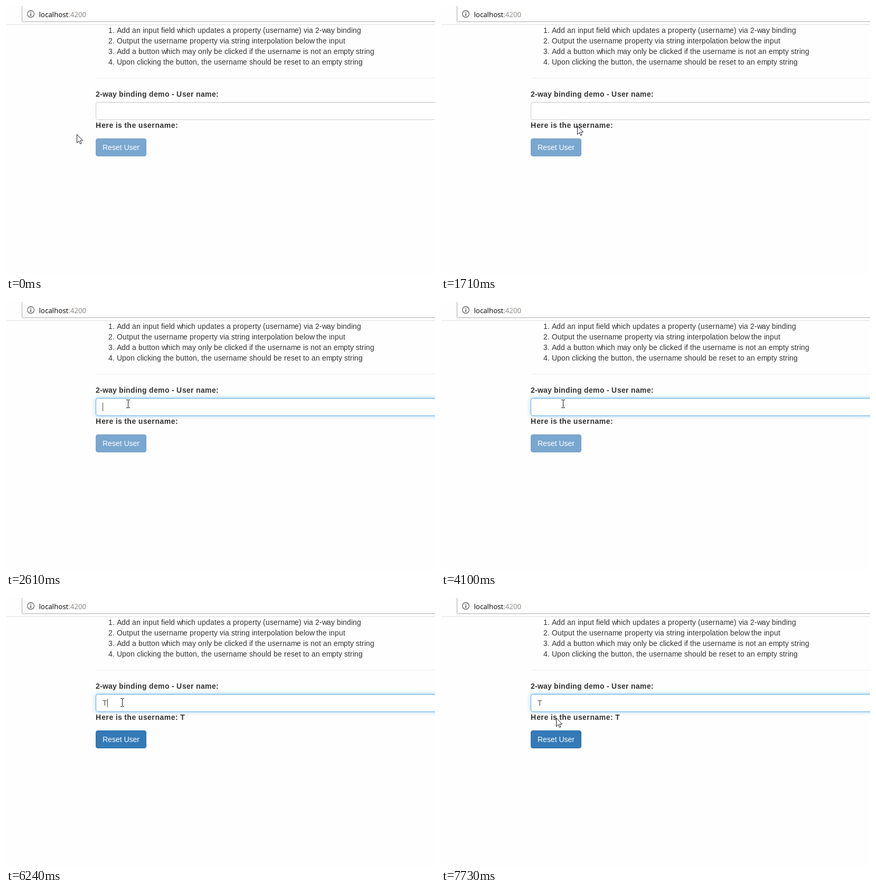
An HTML page for the animation above (8 s loop, 813x508 px).

```html
<!DOCTYPE html>
<html lang="en">
<head>
<meta charset="utf-8">
<title>Two-way binding demo</title>
<style>
  html, body { margin: 0; width: 100%; height: 100%; overflow: hidden; background: #fefefe; }
  #stage { position: absolute; left: 0; top: 0; width: 813px; height: 508px; overflow: hidden; }
  #field {
    position: absolute; left: 170px; top: 182px; width: 800px; height: 34px;
    box-sizing: border-box; border: 1px solid #ccc; border-radius: 4px; background: #fff;
  }
  svg { position: absolute; left: 0; top: 0; display: block; }
  text { font: 14px "Liberation Sans", Arial, sans-serif; fill: #333; white-space: pre; }
  .bold { font-weight: bold; }
  .url { font: 13.3px "Open Sans", "Noto Sans", sans-serif; fill: #000; text-rendering: geometricPrecision; }
</style>
</head>
<body>
<div id="stage">
  <div id="field"></div>
  <svg width="813" height="508" viewBox="0 0 813 508">
    <path d="M0 35.5H813" stroke="#dedede"/>
    <g id="address">
      <path d="M30.5 -2V27.5Q30.5 29.5 32.5 29.5H815V-2Z" stroke="#eee" stroke-width="3"/>
      <path d="M30.5 -2V27.5Q30.5 29.5 32.5 29.5H815V-2Z" fill="#fff" stroke="#b8b8b8"/>
    </g>
    <circle cx="47" cy="15" r="6.4" fill="none" stroke="#555" stroke-width="1.2"/>
    <path d="M47 11V12.6M47 14V19" stroke="#444" stroke-width="1.5"/>
    <text class="url" x="62.5" y="21">localhost<tspan fill="#87807a">:4200</tspan></text>

    <g id="list"></g>
    <path d="M170 136.5H813" stroke="#eee"/>

    <text id="label" class="bold" y="172"></text>
    <text id="typed" x="183" y="204" style="fill:#555"></text>
    <path id="caret" d="M.5 191V207" stroke="#444"/>
    <text id="echo" class="bold" y="231"></text>

    <g id="button">
      <rect x="170.5" y="251.5" width="95" height="33" rx="3.5" fill="#337ab7" stroke="#2e6da4"/>
      <text x="183" y="273" style="fill:#fff">Reset User</text>
    </g>

    <path id="arrow" d="M.5 .5V16.5L4.3 12.9L6.6 18.3L9 17.3L6.8 12H11.7Z"
          fill="#fff" stroke="#1c1c28" stroke-linejoin="round"/>
    <path id="beam" d="M-3 -7.5H0M1 -7.5H4M.5 -7V7M-3 7.5H0M1 7.5H4" fill="none" stroke="#111"/>
  </svg>
</div>
<script>
const LOOP = 8000;
const FOCUS_AT = 2470, TYPE_AT = 4360;
const TICK = 142;   // the pointer is redrawn once per tick
const BLINK = 515;  // half a caret period
const $ = id => document.getElementById(id);
const ctx = document.createElement("canvas").getContext("2d");

// Sets text with every glyph advance rounded to whole pixels
function snap(el, label, left, bold = false, extra = 0) {
  ctx.font = `${bold ? "bold " : ""}100px "Liberation Sans", Arial, sans-serif`;
  let x = left;
  const xs = [...label].map(ch => {
    const at = x, w = ctx.measureText(ch).width * .14;
    x += extra + (bold ? Math.ceil(w) : Math.round(w) - ("mw".includes(ch) ? 1 : 0));
    return at;
  });
  el.setAttribute("x", xs.join(" "));
  el.textContent = label;
}

function addText(parent, y) {
  const el = document.createElementNS("http://www.w3.org/2000/svg", "text");
  el.setAttribute("y", y);
  return parent.appendChild(el);
}

[
  "Add an input field which updates a property (username) via 2-way binding",
  "Output the username property via string interpolation below the input",
  "Add a button which may only be clicked if the username is not an empty string",
  "Upon clicking the button, the username should be reset to an empty string"
].forEach((task, i) => {
  const y = 51 + 20 * i;
  snap(addText($("list"), y), i + 1 + ".", 194);
  snap(addText($("list"), y), task, 210);
});
snap($("label"), "2-way binding demo - User name:", 170, true);

// Pointer sweeps; key points are tick, x, y
const sweeps = [
  { start: 0, keys: [[0, 134, 243], [2, 139, 283], [5, 244, 306], [8, 291, 260], [12, 258, 227], [16, 231, 193]] },
  { start: 6240, keys: [[0, 220, 198], [2, 154, 258], [4, 185, 311], [7, 283, 265], [10, 218, 227]] }
];

const spline = (a, b, c, d, k) =>
  b + k / 2 * (c - a + k * (2 * a - 5 * b + 4 * c - d + k * (3 * (b - c) + d - a)));

function pointer(t) {
  const { start, keys } = sweeps[t < sweeps[1].start ? 0 : 1];
  const last = keys.length - 1;
  const n = Math.min(keys[last][0], Math.floor((t - start) / TICK));
  let i = 0;
  while (i < last - 1 && n >= keys[i + 1][0]) i++;
  const near = [-1, 0, 1, 2].map(d => keys[Math.max(0, Math.min(last, i + d))]);
  const k = (n - near[1][0]) / (near[2][0] - near[1][0]);
  return [1, 2].map(c => Math.round(spline(...near.map(p => p[c]), k)));
}

const show = (id, on) => $(id).setAttribute("visibility", on ? "visible" : "hidden");
const move = (id, x, y) => $(id).setAttribute("transform", `translate(${x} ${y})`);

function setName(name) {
  const line = "Here is the username: " + name;
  if ($("echo").textContent === line) return;
  $("typed").textContent = name;
  snap($("echo"), line, 170, true, .15);
  $("button").setAttribute("opacity", name ? 1 : .65);
}

function setFocus(glow) {
  const mix = (a, b) => Math.round(a + (b - a) * glow);
  $("field").style.borderColor = `rgb(${mix(204, 102)},${mix(204, 175)},${mix(204, 233)})`;
  $("field").style.boxShadow =
    `inset 0 1px 1px rgba(0,0,0,.075), 0 0 8px rgba(102,175,233,${.6 * glow})`;
}

function draw(t) {
  const typed = t >= TYPE_AT;
  setName(typed ? "T" : "");
  setFocus(t < FOCUS_AT ? 0 : t < FOCUS_AT + 140 ? .6 : 1);

  // A key press restarts the blinking a little before its letter shows
  const since = t - (typed ? TYPE_AT - 240 : FOCUS_AT);
  show("caret", since >= 0 && Math.floor(since / BLINK) % 2 === 0);
  move("caret", typed ? 192 : 183, 0);

  const [x, y] = pointer(t);
  const inField = y >= 182 && y < 216;
  show("arrow", !inField);
  show("beam", inField);
  move(inField ? "beam" : "arrow", x, y);
}

function tick() {
  draw(performance.now() % LOOP);
  requestAnimationFrame(tick);
}
tick();
</script>
</body>
</html>
```
